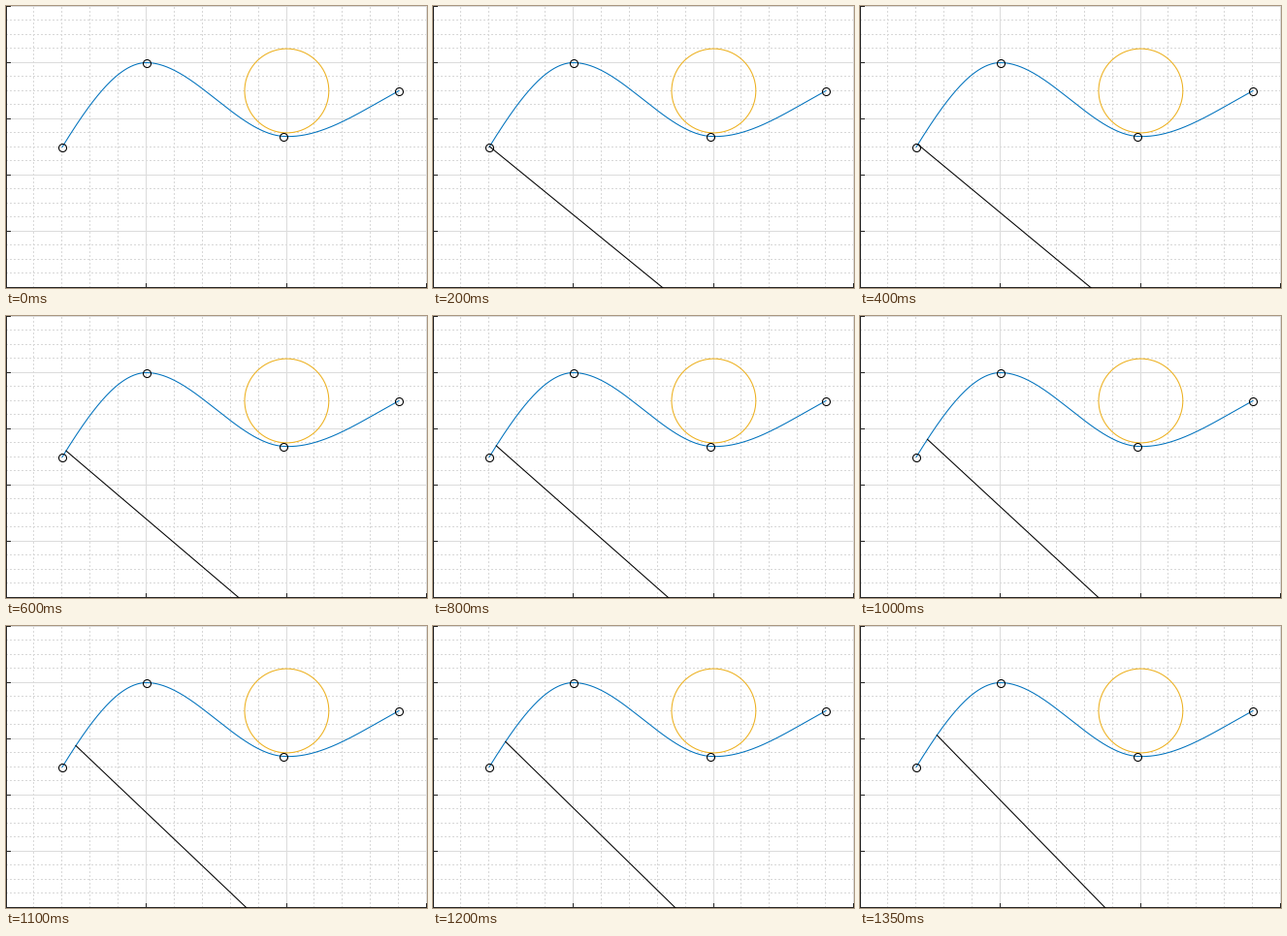
Animation, 434 px wide and 291 px high, one loop 1400 ms. Source, as a matplotlib script:

```python
import numpy as np
import matplotlib.pyplot as plt
from matplotlib.animation import FuncAnimation

W, H, DPI = 434, 291, 64
PX = 72 / DPI                      # points per pixel
FRAMES, INTERVAL = 28, 50
FIRST = 2                          # the rod is hidden before this step

KNOTS_X = np.array([58, 144.7, 286.2, 405])
KNOTS_Y = np.array([145.5, 58.5, 134.5, 87.5])
SLOPES = np.array([-1.62, 0, 0.06, -0.54])
PIVOT = (314.4, 354)               # below the visible area


def track(x):
    """Height of the piecewise cubic track, in pixels from the top."""
    x = np.asarray(x, float)
    i = np.clip(np.searchsorted(KNOTS_X, x, side="right") - 1, 0, 2)
    h = KNOTS_X[i + 1] - KNOTS_X[i]
    s = (x - KNOTS_X[i]) / h
    blend = s * s * (3 - 2 * s)
    bend = SLOPES[i] * s * (1 - s) ** 2 - SLOPES[i + 1] * s * s * (1 - s)
    return KNOTS_Y[i] * (1 - blend) + KNOTS_Y[i + 1] * blend + h * bend


fig = plt.figure(figsize=(W / DPI, H / DPI), dpi=DPI, facecolor="white")
ax = fig.add_axes([0, 0, 1, 1])
ax.set_xlim(0, W)
ax.set_ylim(H, 0)
ax.axis("off")


def rule(x, y, color, **style):
    """One-pixel line; coordinates ending in .5 fill whole pixels."""
    ax.plot(x, y, color=color, lw=PX, solid_capstyle="butt",
            dash_capstyle="butt", snap=False, **style)


def grid():
    minor = dict(color="#d8d8d8", ls=(0, (2, 2)))
    major = dict(color="#dcdcdc", zorder=2.1)
    for k in range(1, 16):
        x = min(int(28.9 * k) + 0.5, W - 0.5)
        rule([x, x], [H, 0], **(minor if k % 5 else major))
    for k in range(20):
        y = int(14.5 * k) + 0.5
        rule([0, W], [y, y], **(minor if k % 4 else major))


def axes_frame():
    ink = dict(color="#262626", zorder=3)
    rule([0.5, 0.5], [0, H], **ink)
    rule([0, W], [H - 0.5] * 2, **ink)
    for y in (0.5, 58.5, 116.5, 174.5, 232.5):
        rule([0, 5], [y, y], **ink)
    for x in (144.5, 289.5, 433.5):
        rule([x, x], [H - 5, H], **ink)


grid()
axes_frame()

xs = np.linspace(KNOTS_X[0], KNOTS_X[-1], 300)
ax.plot(xs, track(xs), color="#0072BD", lw=1.05 * PX, zorder=4)
ax.plot(KNOTS_X, KNOTS_Y, "o", ms=8 * PX, mfc="none", mec="black",
        mew=1.05 * PX, zorder=5, snap=False)
ax.add_patch(plt.Circle((289.4, 87.5), 43.4, fill=False, ec="#EDB120",
                        lw=1.05 * PX, zorder=4))
rod, = ax.plot([], [], color="black", lw=1.05 * PX, zorder=6, snap=False)


def update(frame):
    n = frame - FIRST
    if n < 0:
        rod.set_data([], [])
    else:
        x = KNOTS_X[0] + 0.09 * n + 0.0305 * n * n
        rod.set_data([x, PIVOT[0]], [float(track(x)), PIVOT[1]])
    return rod,


anim = FuncAnimation(fig, update, frames=FRAMES, interval=INTERVAL,
                     repeat=True, repeat_delay=0, blit=False)
plt.show()
```
